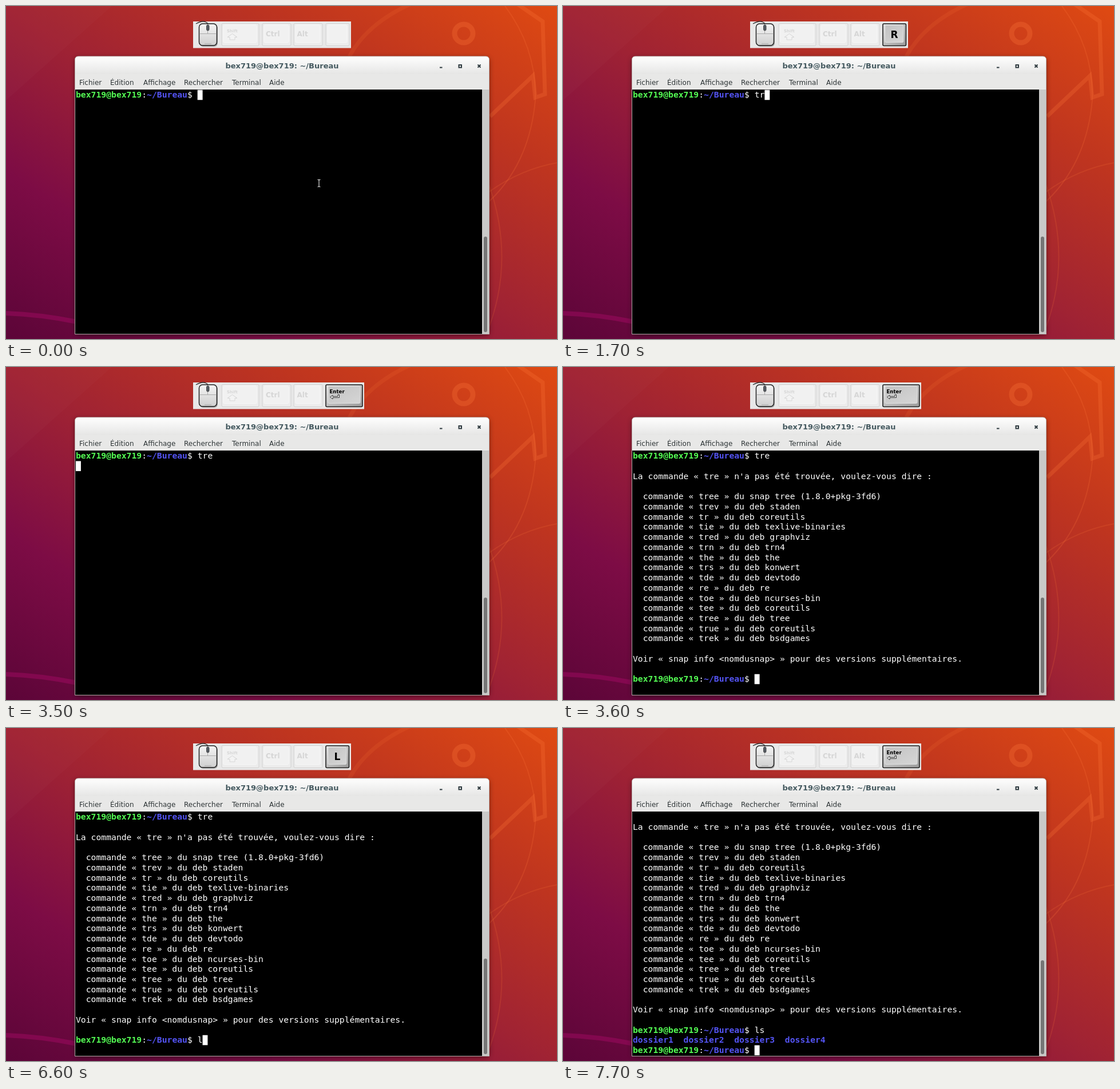
Recreate the animation shown at these times as an HTML page. Size 963 by 582 pixels, loop 8 s.

```html
<!DOCTYPE html>
<html lang="fr">
<head>
<meta charset="utf-8">
<title>Terminal</title>
<style>
html, body { margin: 0; width: 100%; height: 100%; overflow: hidden; background: #9f2333; }
svg { display: block; width: 963px; height: 582px; }
text { white-space: pre; }
.ui { font-family: "DejaVu Sans", Verdana, sans-serif; }
.bold { font-weight: bold; }
.term { font: 14.72px "DejaVu Sans Mono", monospace; fill: #fff; }
.user { font-weight: bold; fill: #54fc54; }
.dir { font-weight: bold; fill: #5454f4; }
.line { fill: none; stroke: #ff7a3c; }
</style>
</head>
<body>
<svg viewBox="0 0 963 582" xmlns="http://www.w3.org/2000/svg">
  <defs>
    <linearGradient id="sky" x1="0" y1="1" x2="1" y2="0">
      <stop offset="0" stop-color="#5c0538"/>
      <stop offset=".25" stop-color="#7d0c45"/>
      <stop offset=".5" stop-color="#a02333"/>
      <stop offset=".75" stop-color="#bf351f"/>
      <stop offset="1" stop-color="#df4a12"/>
    </linearGradient>
    <linearGradient id="bar" x2="0" y2="1">
      <stop offset="0" stop-color="#fefefe"/>
      <stop offset="1" stop-color="#e6e6e5"/>
    </linearGradient>
    <linearGradient id="down" x2="1" y2="1">
      <stop offset="0" stop-color="#e2e2e2"/>
      <stop offset="1" stop-color="#9a9a9a"/>
    </linearGradient>
    <linearGradient id="cap" x2="1" y2="1">
      <stop offset="0" stop-color="#c2c2c2"/>
      <stop offset="1" stop-color="#d6d6d6"/>
    </linearGradient>
    <linearGradient id="mouse" x2="0" y2="1">
      <stop offset="0" stop-color="#f4f4f4"/>
      <stop offset="1" stop-color="#cfcfcf"/>
    </linearGradient>
    <filter id="blur" x="-10%" y="-10%" width="120%" height="120%">
      <feGaussianBlur stdDeviation="5"/>
    </filter>
  </defs>

  <!-- Wallpaper -->
  <rect width="963" height="582" fill="url(#sky)"/>
  <path d="M0 0H185L0 165Z" fill="#fff" opacity=".015"/>
  <g class="line">
    <circle cx="800" cy="48" r="16" stroke-width="9" opacity=".27"/>
    <path d="M890 -6L938 27L942 154L925 160L921 122L846 193" stroke-width="7" opacity=".24"/>
    <path d="M600 88Q632 30 708 -4" stroke-width="7" opacity=".13"/>
    <path d="M872 0Q928 75 925 165Q915 275 844 342" stroke-width="2" opacity=".2"/>
    <path d="M844 325Q900 285 963 274" stroke-width="2" opacity=".16"/>
    <path d="M844 312Q889 440 844 562" stroke-width="2" opacity=".16"/>
  </g>
  <path d="M0 537Q60 539 124 552" fill="none" stroke="#b00a6c" stroke-width="8" opacity=".4"/>

  <!-- Key display -->
  <rect id="panel" x="327" y="27" width="276" height="46.5" fill="#e8e8e8"/>
  <path d="M332 31Q343 25 349 28T353 34" fill="none" stroke="#333" stroke-width="1.3"/>
  <rect x="338.5" y="32" width="31.5" height="39" rx="6" fill="#777" opacity=".6"/>
  <rect x="337.5" y="31" width="31" height="38" rx="6" fill="url(#mouse)" stroke="#222" stroke-width="1.5"/>
  <path d="M339 48.5H367M352.5 32V48" fill="none" stroke="#aaa"/>
  <rect x="350.5" y="33" width="4.5" height="10" rx="2.2" fill="#555b63" stroke="#333" stroke-width=".8"/>
  <path d="M347 66H359" stroke="#aaa"/>
  <g id="idle"></g>
  <g class="ui bold" fill="#d6d6d6">
    <text x="386" y="45.5" font-size="7">Shift</text>
    <text x="454" y="53" font-size="12">Ctrl</text>
    <text x="508.5" y="53" font-size="12">Alt</text>
  </g>
  <path d="M395.5 48.5L404 54.5H400V59H391V54.5H387Z" fill="#f3f3f3" stroke="#d6d6d6"/>
  <g id="pressed">
    <rect id="keyBody" x="559" y="31" height="38.5" rx="2" fill="url(#down)" stroke="#222" stroke-width="1.6"/>
    <rect id="keyTop" x="563" y="33.5" height="30" rx="2" fill="url(#cap)" stroke="#e6e6e6" stroke-width=".8"/>
    <text id="letter" class="ui bold" x="579" y="56" font-size="17" text-anchor="middle"></text>
    <g id="enter">
      <text class="ui bold" x="565.5" y="45.5" font-size="8.6">Enter</text>
      <path d="M582.5 48.5V53.5H571V56L566.5 52.5L571 49.5V51.5H580V48.5Z" fill="#eee" stroke="#222" stroke-width=".9"/>
    </g>
  </g>

  <!-- Window -->
  <rect x="121" y="91" width="723" height="484" rx="5" opacity=".5" filter="url(#blur)"/>
  <path d="M120.5 573.5V94Q120.5 88 126.5 88H838.5Q844.5 88 844.5 94V573.5Z" fill="#e8e8e7" stroke="#b5aaa8"/>
  <path d="M121 119V94Q121 88.5 126.5 88.5H838.5Q844 88.5 844 94V119Z" fill="url(#bar)"/>
  <text class="ui bold" x="482.5" y="109" font-size="13" text-anchor="middle" fill="#455a60">bex719@bex719: ~/Bureau</text>
  <g fill="none" stroke="#2f3b40" stroke-width="2">
    <path d="M758 107.5H762.5M824.5 102.5L829.5 107.5M829.5 102.5L824.5 107.5"/>
    <rect x="791.5" y="103" width="4.5" height="4.5"/>
  </g>
  <g id="menu" class="ui" font-size="12" fill="#2d3436"></g>
  <rect x="121" y="146" width="711" height="427" fill="#000"/>
  <rect x="832" y="146" width="12" height="427" fill="#c9c9c8"/>
  <rect id="thumb" x="835" width="6" rx="3" fill="#757575"/>
  <g id="screen" class="term"></g>
  <rect id="cursor" width="8.9" height="17.5" fill="#fff"/>
  <path id="pointer" d="M544.5 303.5H546L547 304.5L548 303.5H549.5M547 304.5V315M544.5 316H546L547 315L548 316H549.5" fill="none" stroke="#ddd" stroke-width="1.2"/>
</svg>
<script>
const LOOP = 8000, LEFT = 122, TOP = 146.7, COL = 8.862, ROW = 17.73;
const $ = id => document.getElementById(id);

// Each track lists [start time, value]; values hold until the next entry.
const tracks = {
  first: [[0, ''], [1400, 't'], [1700, 'tr'], [2400, 'tre']],
  second: [[0, ''], [6500, 'l'], [6800, 'ls']],
  key: [[0, ''], [1400, 'T'], [1700, 'R'], [2300, ''], [2400, 'E'], [3000, ''],
    [3500, 'Enter'], [4000, ''], [6600, 'L'], [6900, 'S'], [7500, ''], [7700, 'Enter']],
  phase: [[0, 'typing'], [3500, 'waiting'], [3600, 'answer'], [7700, 'listing']]
};
const blinks = [400, 1000, 2300, 2400, 3000, 3500, 4000, 4600, 5200, 5800, 7400, 7700];

const hints = `tree:snap tree (1.8.0+pkg-3fd6)
trev:deb staden
tr:deb coreutils
tie:deb texlive-binaries
tred:deb graphviz
trn:deb trn4
the:deb the
trs:deb konwert
tde:deb devtodo
re:deb re
toe:deb ncurses-bin
tee:deb coreutils
tree:deb tree
true:deb coreutils
trek:deb bsdgames`.split('\n').map(hint => {
  const [name, origin] = hint.split(':');
  return `  commande « ${name} » du ${origin}`;
});
const answer = ['', "La commande « tre » n'a pas été trouvée, voulez-vous dire :", '', ...hints, '',
  'Voir « snap info <nomdusnap> » pour des versions supplémentaires.', ''];
const folders = [1, 2, 3, 4].map(n => 'dossier' + n).join('  ');

const valueAt = (track, t) => track.filter(([start]) => start <= t).pop()[1];
const escapeText = s => s.replace(/&/g, '&amp;').replace(/</g, '&lt;');
const prompt = cmd =>
  `<tspan class="user">bex719@bex719</tspan>:<tspan class="dir">~/Bureau</tspan>$ ${cmd}`;
const show = (el, on) => el.setAttribute('visibility', on ? 'inherit' : 'hidden');

function screenState({ first, second, phase }) {
  const rows = [prompt(first)];
  let column = 24 + first.length;
  if (phase === 'waiting') {
    rows.push('');
    column = 0;
  } else if (phase !== 'typing') {
    rows.push(...answer.map(escapeText), prompt(second));
    column = 24 + second.length;
  }
  if (phase === 'listing') {
    rows.push(`<tspan class="dir">${folders}</tspan>`, prompt(''));
    column = 24;
  }
  return { rows: rows.slice(-24), column };
}

function drawKey(key) {
  const wide = key === 'Enter';
  $('panel').setAttribute('width', wide ? 299 : 276);
  $('keyBody').setAttribute('width', wide ? 64 : 40.5);
  $('keyTop').setAttribute('width', wide ? 56 : 32);
  $('letter').textContent = wide ? '' : key;
  show($('pressed'), key);
  show($('enter'), wide);
}

let last = '';
function draw(t) {
  const state = { blink: blinks.filter(time => time <= t).length % 2 === 0 };
  for (const name in tracks) state[name] = valueAt(tracks[name], t);
  const stamp = JSON.stringify(state);
  if (stamp === last) return;
  last = stamp;

  const { rows, column } = screenState(state);
  $('screen').innerHTML = rows.map((row, i) =>
    `<text x="${LEFT}" y="${(TOP + 13.6 + i * ROW).toFixed(2)}">${row}</text>`).join('');
  $('cursor').setAttribute('x', LEFT + column * COL);
  $('cursor').setAttribute('y', TOP + (rows.length - 1) * ROW);
  show($('cursor'), state.blink);
  show($('pointer'), !state.first);
  drawKey(state.key);
  const thumbTop = state.phase === 'listing' ? 406 : 403;
  $('thumb').setAttribute('y', thumbTop);
  $('thumb').setAttribute('height', 570 - thumbTop);
}

$('idle').innerHTML = [[377, 65], [448, 50], [503, 50], [559, 41]].map(([x, w]) =>
  `<rect x="${x}" y="30.5" width="${w}" height="39" rx="2" fill="#ececec" stroke="#d2d2d2"/>
   <rect x="${x + 3}" y="33" width="${w - 7}" height="31" rx="2" fill="#f1f1f1" stroke="#f7f7f7"/>`).join('');
$('menu').innerHTML = [['Fichier', 128], ['Édition', 182], ['Affichage', 240],
  ['Rechercher', 311], ['Terminal', 395], ['Aide', 460]].map(([label, x]) =>
  `<text x="${x}" y="137.5">${label}</text>`).join('');

const begin = performance.now();
function tick() {
  draw((performance.now() - begin) % LOOP);
  requestAnimationFrame(tick);
}
tick();
</script>
</body>
</html>
```
